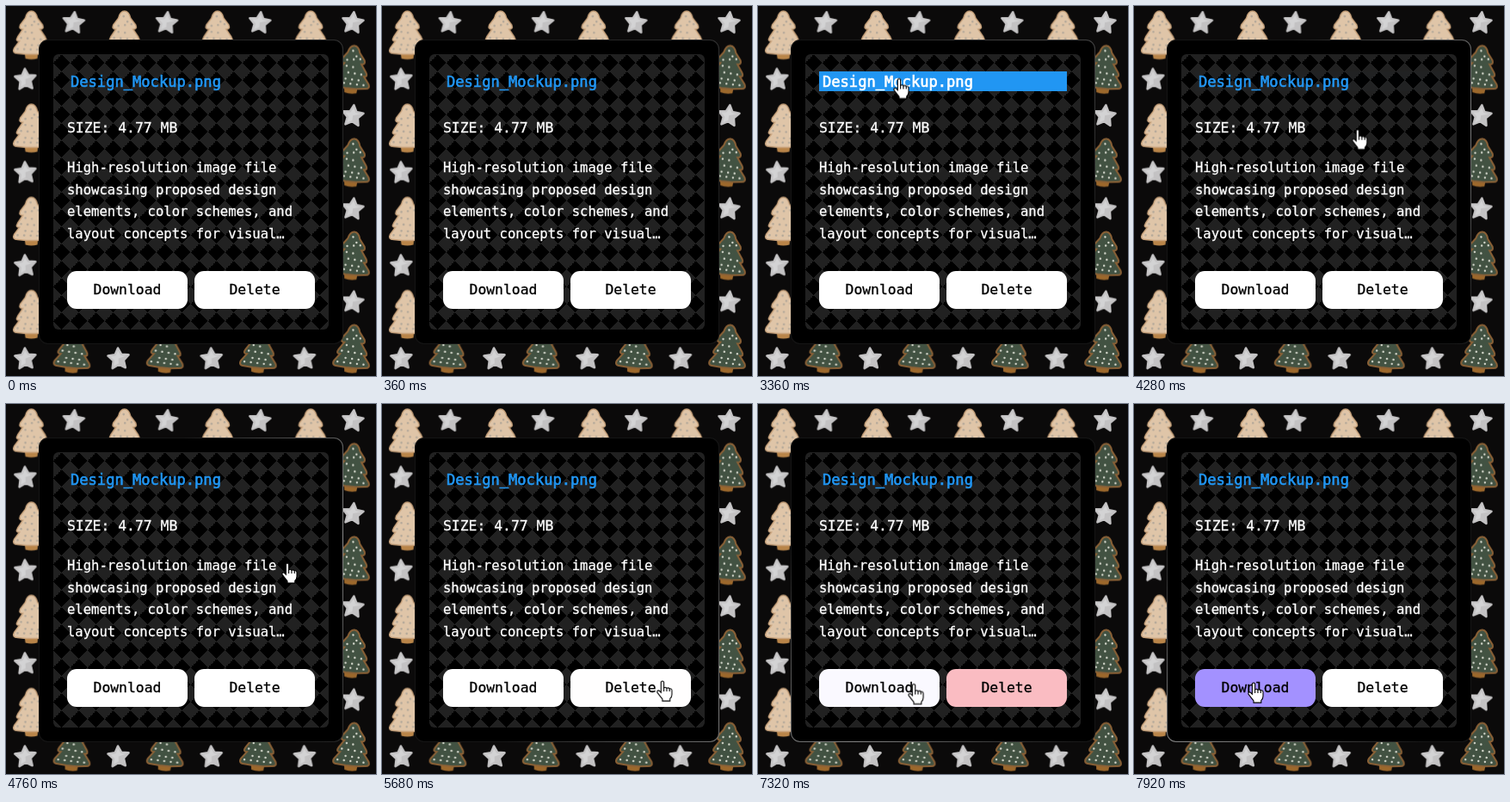
Recreate the animation shown at these times as an HTML page. Size 430x430 px, loop 8000 ms.

```html
<!DOCTYPE html>
<html lang="en">
<head>
<meta charset="utf-8">
<title>File card</title>
<style>
@property --angle { syntax: "<angle>"; inherits: false; initial-value: 45deg; }
@property --glow { syntax: "<color>"; inherits: false; initial-value: #303030; }

html, body { margin: 0; width: 100%; height: 100%; overflow: hidden; background: #0b0a0a; }
.stage { position: relative; width: 430px; height: 430px; overflow: hidden; }
.stage, .stage * { box-sizing: border-box; }
.stage > *, .panel > * { position: absolute; }
.wall { inset: 0; }

.card {
  left: 38px; top: 39px; width: 354px; height: 354px;
  padding: 1px; border-radius: 11px;
  background: conic-gradient(from calc(var(--angle) - 75deg),
    #151515, var(--glow) 75deg, #151515 150deg);
  animation: glow 8s infinite;
}
.card::before {
  content: ""; display: block; height: 100%;
  border-radius: 10px; background: #000;
}
.panel {
  left: 55px; top: 56px; width: 320px; height: 320px;
  border-radius: 6px; color: #fff;
  font: 15.55px/25.6px "DejaVu Sans Mono", "Noto Sans Mono", monospace;
  -webkit-text-stroke: .3px;
  white-space: pre;
  background:
    linear-gradient(45deg, #212121 25%, transparent 25% 75%, #212121 75%) 0 0 / 20px 20px,
    linear-gradient(-45deg, #212121 25%, transparent 25% 75%, #212121 75%) 0 0 / 20px 20px,
    #000;
}
.title {
  left: 16px; top: 20px; width: 288px; height: 23px; padding-left: 4px;
  font-size: 17.1px; line-height: 24px; color: #2196f3;
  -webkit-text-stroke: .65px;
  animation: title 8s infinite;
}
.size { left: 16px; top: 73px; font-size: 16.4px; }
.about { left: 16px; top: 120px; }
.button {
  top: 252px; width: 140px; height: 44px; border-radius: 11px;
  background: #fff; color: #000; text-align: center;
  font-size: 16.4px; line-height: 44px;
}
.download { left: 16px; animation: download 8s infinite; }
.delete { left: 164px; animation: delete 8s infinite; }

.move-x, .move-y { width: 0; height: 0; }
.move-x { left: 0; top: 0; animation: move-x 8s infinite ease-in-out, show 8s infinite step-end; }
.move-y { animation: move-y 8s infinite ease-in-out; }
.cursor { position: absolute; left: 0; top: 0; overflow: visible; fill: #fff; stroke: #000; }
.arrow { animation: arrow 8s infinite step-end; }
.hand { animation: hand 8s infinite step-end; }

@keyframes show { 0% { visibility: hidden; } 28.95%, 100% { visibility: visible; } }
@keyframes arrow { 0% { opacity: 1; } 33.2%, 100% { opacity: 0; } }
@keyframes hand { 0% { opacity: 0; } 33.2%, 100% { opacity: 1; } }

@keyframes move-x {
  0%, 29% { transform: translateX(6px); }
  39%, 48% { transform: translateX(164px); }
  58%, 64% { transform: translateX(327px); }
  68.5% { transform: translateX(345px); animation-timing-function: ease-in; }
  71% { transform: translateX(326px); animation-timing-function: ease-out; }
  74%, 85% { transform: translateX(305px); }
  95%, 100% { transform: translateX(139px); }
}
@keyframes move-y {
  0%, 29% { transform: translateY(13px); }
  39%, 48% { transform: translateY(84.5px); }
  58%, 64% { transform: translateY(185px); }
  71% { transform: translateY(322px); animation-timing-function: ease-out; }
  74%, 85% { transform: translateY(330px); }
  95%, 100% { transform: translateY(324px); }
}
@keyframes title {
  0%, 37.5% { background: #2196f300; color: #2196f3; }
  41.5%, 50% { background: #2196f3; color: #fff; }
  54%, 100% { background: #2196f300; color: #2196f3; }
}
@keyframes delete {
  0%, 70.5% { background: #fff; animation-timing-function: ease-in-out; }
  78%, 90% { background: #f5828e; }
  95.5%, 100% { background: #fff; }
}
@keyframes download {
  0%, 91% { background: #fff; }
  98.5%, 100% { background: #a391ff; }
}
@keyframes glow {
  0%, 33% { --angle: 45deg; --glow: #303030; }
  42%, 48% { --angle: 35deg; --glow: #484848; }
  59%, 64% { --angle: 72deg; --glow: #8a8a8a; }
  71% { --angle: 128deg; --glow: #777; }
  74%, 85% { --angle: 138deg; --glow: #777; }
  96%, 100% { --angle: 220deg; --glow: #858585; }
}
</style>
</head>
<body>
<div class="stage">
  <svg class="wall" width="430" height="430">
    <defs>
      <path id="tree" d="M0-28Q5-28 7-20L13-12Q15-7 10-7L16 2Q19 7 14 7L20 15Q23 21 16 21L6 22H-6L-16 21Q-23 21-20 15L-14 7Q-19 7-16 2L-10-7Q-15-7-13-12L-7-20Q-5-28 0-28Z"/>
      <path id="trunk" d="M-8 19H8L7 27Q0 29-7 27Z"/>
      <path id="dots" d="M-1-22L4-15M-7-11L9-13M-7-4L8-2M-12 3L13 5M-7 11L13 12M-16 16L17 17"
        fill="none" stroke-linecap="round" stroke-dasharray="0 7.6"/>
      <g id="star" stroke-linejoin="round">
        <path d="M0-12L3.7-4.6 12-3.6 6 2.4 7.5 11 0 7-7.5 11-6 2.4-12-3.6-3.7-4.6Z"
          fill="#d3d3d4" stroke="#c6c5c6" stroke-width="2.6"/>
        <path d="M0 0L12-3.6 6 2.4 7.5 11 0 7Z" fill="#c3c2c3"/>
      </g>
      <pattern id="cookies" width="108.2" height="108.2" patternUnits="userSpaceOnUse">
        <g transform="translate(29.5 34)">
          <use href="#trunk" fill="#b98549"/>
          <use href="#tree" fill="#dfc5a8" stroke="#c9a37c" stroke-width="1.5"/>
          <use href="#dots" stroke="#b3a899" stroke-width="2.6"/>
        </g>
        <g transform="translate(78 74) rotate(5)">
          <use href="#trunk" fill="#9c682c"/>
          <use href="#tree" fill="#425242" stroke="#8b6136" stroke-width="2"/>
          <use href="#dots" stroke="#d5d8cc" stroke-width="2.5"/>
        </g>
        <use href="#star" transform="translate(78.5 19) rotate(6)"/>
        <use href="#star" transform="translate(22.5 85) rotate(-3)"/>
      </pattern>
    </defs>
    <rect width="430" height="430" fill="url(#cookies)"/>
  </svg>

  <div class="card"></div>
  <div class="panel">
    <div class="title">Design_Mockup.png</div>
    <div class="size">SIZE: 4.77 MB</div>
    <div class="about">High-resolution image file
showcasing proposed design
elements, color schemes, and
layout concepts for visual…</div>
    <div class="button download">Download</div>
    <div class="button delete">Delete</div>
  </div>

  <div class="move-x"><div class="move-y">
    <svg class="cursor arrow" width="12" height="19">
      <path d="M0 0V16L4 12.5 6.5 18 9 17 6.5 11.5H11.5Z"/>
    </svg>
    <svg class="cursor hand" width="18" height="23">
      <g transform="scale(1.1) translate(-6.5 -1)">
        <path d="M5 2Q6.5 0 8 2V8Q10 7 11 8.5 13 7.5 14 9 16.5 8.5 16.5 11V15Q16.5 18 14.5 19.5V22H6.5V20Q4 17 1 13 .5 10.5 3 11L5 13Z"/>
        <path d="M8 8V12M11 8.5V12M14 9V12" fill="none"/>
      </g>
    </svg>
  </div></div>
</div>
</body>
</html>
```
